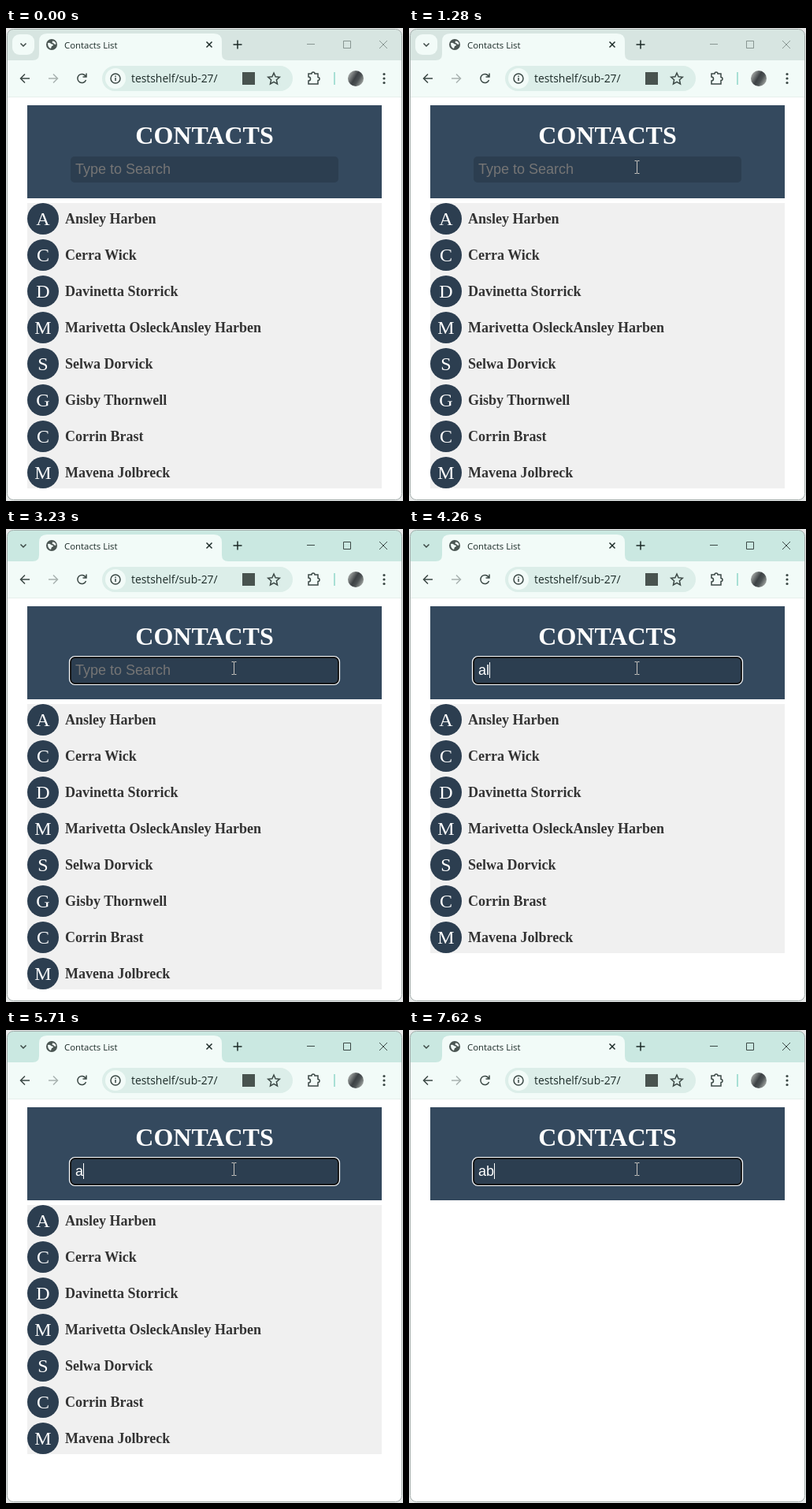
Recreate the animation shown at these times as an HTML page. Size 504x600 px, loop 8000 ms.

```html
<!DOCTYPE html>
<html lang="en">
<head>
<meta charset="utf-8">
<title>Contacts List</title>
<style>
html, body { margin: 0; width: 100%; height: 100%; overflow: hidden; background: #e6e8e8; }
svg { display: block; width: 504px; height: 600px; }
.ui { font-family: "Open Sans", "Noto Sans", sans-serif; fill: #1c2b28; }
.serif { font-family: "Liberation Serif", "Times New Roman", serif; }
.field { font: 18px "Liberation Sans", Arial, sans-serif; }
.line { fill: none; stroke: #3b4845; stroke-width: 1.5; }
.name { font-size: 18px; font-weight: bold; fill: #333; }
.initial { font-size: 24px; fill: #fff; text-anchor: middle; }
</style>
</head>
<body>
<svg viewBox="0 0 504 600">
  <defs>
    <clipPath id="frame"><rect x="1.5" y="1.5" width="501" height="597" rx="8"/></clipPath>
    <linearGradient id="photo" x1="0" y1="0.2" x2="1" y2="0.8">
      <stop offset="0" stop-color="#b4b8b5"/><stop offset=".45" stop-color="#3c4144"/>
      <stop offset=".65" stop-color="#4c5254"/><stop offset="1" stop-color="#b0b4b0"/>
    </linearGradient>
  </defs>

  <g clip-path="url(#frame)">
    <rect width="504" height="600" fill="#fff"/>
    <rect width="504" height="44" fill="#d7e5e1"/>
    <rect id="bar" width="504" height="44" fill="#cae8e1"/>
    <path d="M0 87V41H34Q42 41 42 33V17Q42 7 52 7H264Q274 7 274 17V33Q274 41 282 41H504V87Z" fill="#f2fbf8"/>
    <rect y="87" width="504" height="1" fill="#e6efec"/>
    <rect id="menu" x="8" y="8" width="28" height="26" rx="9" fill="#f2fbf8"/>
  </g>
  <rect x="1.5" y="1.5" width="501" height="597" rx="8" fill="none" stroke="#a3acaa"/>

  <!-- tab strip -->
  <path class="line" d="M18.5 19.5l3.5 3.5 3.5-3.5"/>
  <circle cx="58" cy="21" r="7" fill="#4b5653"/>
  <path d="M53 19q3-1 4 1l3 1q0 2-2 2l-1 3q-4-1-4-7M59 16.5q4 0 4.5 4q-2 1-3-1l-2-1Z" fill="#f2fbf8"/>
  <text class="ui" x="74" y="26" font-size="11.4">Contacts List</text>
  <path class="line" d="M254.5 17.5l7 7m0-7l-7 7M288.5 21h11M294 15.5v11" style="stroke:#1c2b28"/>
  <path id="controls" class="line" d="M382 20.5h10M428.5 16.5h9v9h-9zM474 16l10 10m0-10l-10 10" style="stroke-width:1"/>

  <!-- toolbar -->
  <path class="line" d="M30 64H18.5M24 58.5l-5.5 5.5 5.5 5.5M101 61A5.5 5.5 0 1 0 101.5 66M102 57.5v4.5h-4.5"/>
  <path class="line" d="M54 64h11.5M60 58.5l5.5 5.5-5.5 5.5" style="stroke:#a9b3b0"/>
  <rect x="122" y="48" width="242" height="32" rx="16" fill="#dceee9"/>
  <circle cx="139" cy="64" r="13" fill="#f2fbf8"/>
  <path class="line" d="M133 64a6 6 0 1 0 12 0a6 6 0 1 0-12 0M139 63v4M139 60.5v1.5"/>
  <text class="ui" x="159" y="69" font-size="13.9">testshelf/sub-27/</text>
  <rect x="300" y="56" width="16" height="16" fill="#48534f"/>
  <path class="line" d="M340 57l2.1 4.8 5.2.5-3.9 3.5 1.1 5.2-4.5-2.7-4.5 2.7 1.1-5.2-3.9-3.5 5.2-.5Z"/>
  <path class="line" d="M384 58h4a2 2 0 0 1 4 0h4v4.5a2 2 0 0 1 0 4v4.5h-12v-4a2.5 2.5 0 0 0 0-5Z"/>
  <rect x="416" y="56" width="2" height="16" fill="#a8e0d5"/>
  <circle cx="444" cy="64" r="10" fill="url(#photo)"/>
  <g fill="#3b4845"><circle cx="480" cy="58.5" r="1.6"/><circle cx="480" cy="64" r="1.6"/><circle cx="480" cy="69.5" r="1.6"/></g>

  <!-- page -->
  <rect x="27" y="98" width="450" height="118" fill="#34495e"/>
  <text class="serif" x="252" y="147" font-size="32" font-weight="bold" fill="#fff" text-anchor="middle">CONTACTS</text>
  <rect x="82" y="163" width="340" height="33" rx="5" fill="#2c3e50"/>
  <g id="ring" fill="none">
    <rect x="82" y="163" width="340" height="33" rx="5.5" stroke="#101010" stroke-width="2"/>
    <rect x="80.5" y="161.5" width="343" height="36" rx="7" stroke="#fff" stroke-width="1.2"/>
  </g>
  <text id="query" class="field" x="88" y="185"></text>
  <rect id="caret" width="1" height="20" fill="#fff"/>
  <rect id="panel" x="27" y="222" width="450" fill="#f0f0f0"/>
  <g id="list" class="serif"></g>

  <path id="arrow" d="M.5 .5v16l3.7-3.5 2.5 5.5 2.3-1-2.5-5.5h5Z" fill="#fff" stroke="#000"/>
  <path id="beam" d="M-3 -8h2.5l.5 .5 .5-.5h2.5M0 -7.5v15M-3 8h2.5l.5-.5 .5 .5h2.5" fill="none" stroke="#c8c5c0"/>
</svg>

<script>
const LOOP = 8000;
const names = ["Ansley Harben", "Cerra Wick", "Davinetta Storrick", "Marivetta OsleckAnsley Harben",
  "Selwa Dorvick", "Gisby Thornwell", "Corrin Brast", "Mavena Jolbreck"];

// [start time, value]
const typed = [[0, ""], [3840, "a"], [4260, "al"], [5510, "a"], [7470, "ab"]];
const filters = [[0, ""], [3990, "a"], [4310, "al"], [5710, "a"], [7620, "ab"]];
const carets = [[0, 0], [1650, 1], [2180, 0], [2690, 1], [3230, 0], [3740, 1], [4760, 0],
  [5300, 1], [5810, 0], [6350, 1], [6860, 0], [7370, 1]];
const focus = [[0, 0], [1650, .35], [1690, .7], [1740, 1]];
const caretX = { "": 88, a: 98, al: 102, ab: 108 };

const $ = id => document.getElementById(id);
const at = (track, t) => track.findLast(([start]) => t >= start)[1];
const show = (id, on) => $(id).setAttribute("visibility", on ? "visible" : "hidden");
const set = (id, attrs) => { for (const k in attrs) $(id).setAttribute(k, attrs[k]); };

let shown = null;
function drawList(filter) {
  if (filter === shown) return;
  shown = filter;
  const rows = names.filter(n => n.includes(filter));
  set("panel", { height: Math.max(0, rows.length * 46 - 6) });
  $("list").innerHTML = rows.map((n, i) => `<g transform="translate(27 ${222 + i * 46})">
    <circle cx="20" cy="20" r="20" fill="#2c3e50"/>
    <text class="initial" x="20" y="28">${n[0]}</text>
    <text class="name" x="48" y="26">${n}</text></g>`).join("");
}

function drawPointer(t) {
  const step = Math.min(9, Math.floor((t - 830) / 50));
  const p = 1 - (1 - step / 9) ** 2;
  const x = Math.round(494 - 205 * p), y = Math.round(212 - 35 * p);
  const overField = x < 422 && y < 196;
  show("arrow", step >= 0 && !overField);
  show("beam", step >= 0 && overField);
  set("arrow", { transform: `translate(${x} ${y})` });
  set("beam", { transform: `translate(${x + .5} ${y - .5})` });
}

function draw(t) {
  const active = at(focus, t), text = at(typed, t);
  set("bar", { opacity: active });
  set("menu", { opacity: 1 - active });
  set("controls", { opacity: .5 + .5 * active });
  show("ring", active);
  $("query").textContent = text || "Type to Search";
  set("query", { fill: text ? "#fff" : "#757575" });
  show("caret", at(carets, t));
  set("caret", { x: caretX[text], y: text ? 169 : 170 });
  drawList(at(filters, t));
  drawPointer(t);
}

function tick() {
  draw(performance.now() % LOOP);
  requestAnimationFrame(tick);
}
tick();
</script>
</body>
</html>
```
